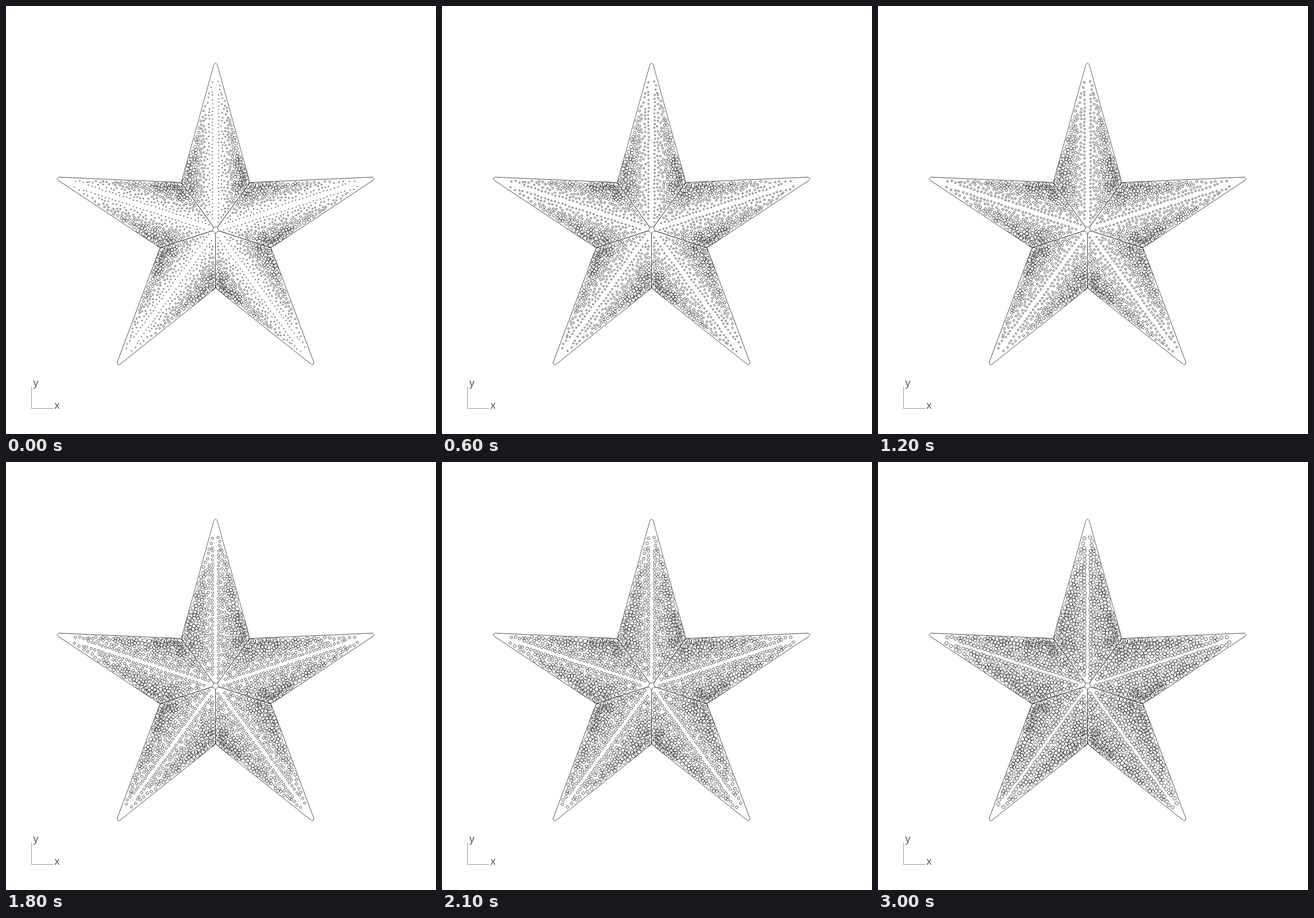
These frames come from a looping animation (750x746 px, 3.3 s). An HTML page with a canvas:

```html
<!DOCTYPE html>
<html lang="en">
<head>
<meta charset="utf-8">
<title>Star</title>
<style>
html, body { margin: 0; width: 100%; height: 100%; overflow: hidden; background: #fff; }
canvas { display: block; }
</style>
</head>
<body>
<canvas id="stage" width="750" height="746"></canvas>
<script>
const ctx = document.getElementById('stage').getContext('2d');
const LOOP = 3300;
const STEPS = [300, 600, 1200, 1500, 1800, 2100, 2700, 3000];
const CX = 365.5, CY = 390;

// One arm is a kite: u runs across the axis, h runs from the centre to the tip.
const TIP = 298.2;
const HALF_TIP = 15.5 * Math.PI / 180;
const HALF_BASE = Math.PI / 5;
const SHOULDER_H = TIP * Math.tan(HALF_TIP) / (Math.tan(HALF_TIP) + Math.tan(HALF_BASE));
const SHOULDER_U = SHOULDER_H * Math.tan(HALF_BASE);
const INSET = 3.9;
const GAP = 4.6;

function makeRandom(seed) {
  return () => {
    seed = (seed + 0x6D2B79F5) | 0;
    let v = Math.imul(seed ^ (seed >>> 15), 1 | seed);
    v = (v + Math.imul(v ^ (v >>> 7), 61 | v)) ^ v;
    return ((v ^ (v >>> 14)) >>> 0) / 4294967296;
  };
}

// Distance from a point to the nearest side of the kite, negative outside.
function edgeDistance(u, h) {
  const a = Math.abs(u);
  return Math.min(
    (TIP - h) * Math.sin(HALF_TIP) - a * Math.cos(HALF_TIP),
    h * Math.sin(HALF_BASE) - a * Math.cos(HALF_BASE)
  );
}

function makeDots() {
  const rnd = makeRandom(11);
  const dots = [
    [-5.5, 257], [4.5, 258.5], [7.8, 251.6], [-7.7, 248], [7, 244.4],
    [-6, 240], [9.5, 238.5], [-11.3, 237.7], [11, 235.3], [-5.5, 235], [5.5, 235]
  ];

  function add(u, h) {
    if (edgeDistance(u, h) < INSET) return;
    const space = 5.4 - Math.abs(u) / 36;
    if (dots.every(d => Math.hypot(d[0] - u, d[1] - h) > space)) dots.push([u, h]);
  }

  // Two loose columns line the bare axis.
  for (const side of [-1, 1]) {
    for (let h = 13; h < 231; h += 5.6 + rnd() * 1.8) add(side * (GAP + rnd() * 1.6), h);
  }
  for (let i = 0; i < 7000; i++) {
    const u = (GAP + rnd() * (SHOULDER_U - GAP)) * (rnd() < 0.5 ? -1 : 1);
    add(u, 12 + rnd() * 220);
  }
  return dots;
}

const dots = makeDots();

function drawOutline() {
  ctx.beginPath();
  ctx.moveTo(SHOULDER_U / 2, -(TIP + SHOULDER_H) / 2);
  ctx.arcTo(SHOULDER_U, -SHOULDER_H, 0, 0, 12);
  ctx.arcTo(0, 0, -SHOULDER_U, -SHOULDER_H, 6.3);
  ctx.arcTo(-SHOULDER_U, -SHOULDER_H, 0, -TIP, 12);
  ctx.arcTo(0, -TIP, SHOULDER_U, -SHOULDER_H, 3);
  ctx.closePath();
  ctx.lineWidth = 0.85;
  ctx.strokeStyle = '#444';
  ctx.stroke();
}

function drawDots(minR) {
  ctx.beginPath();
  for (const [u, h] of dots) {
    const k = Math.min(1, Math.pow(Math.abs(u) / 50, 1.7));
    const r = minR + (4.3 - minR) * k;
    ctx.moveTo(u + r, -h);
    ctx.arc(u, -h, r, 0, Math.PI * 2);
  }
  ctx.lineWidth = 0.7;
  ctx.strokeStyle = '#222';
  ctx.stroke();
}

function drawAxes() {
  ctx.beginPath();
  ctx.moveTo(44.5, 664);
  ctx.lineTo(44.5, 701.5);
  ctx.lineTo(82, 701.5);
  ctx.lineWidth = 1;
  ctx.strokeStyle = '#999';
  ctx.stroke();
  ctx.fillStyle = '#555';
  ctx.font = '18px "Liberation Sans", Arial, sans-serif';
  ctx.fillText('y', 47.5, 663);
  ctx.fillText('x', 84.5, 702);
}

function draw(step) {
  ctx.fillStyle = '#fff';
  ctx.fillRect(0, 0, 750, 746);
  drawAxes();
  for (let i = 0; i < 5; i++) {
    ctx.save();
    ctx.translate(CX, CY);
    ctx.rotate(i * Math.PI * 2 / 5);
    drawOutline();
    drawDots(0.6 + 0.285 * step);
    ctx.restore();
  }
}

const start = performance.now();
let shown = -1;

function tick() {
  const t = (performance.now() - start) % LOOP;
  const step = STEPS.filter(s => t >= s).length;
  if (step !== shown) draw(shown = step);
  requestAnimationFrame(tick);
}
tick();
</script>
</body>
</html>
```
